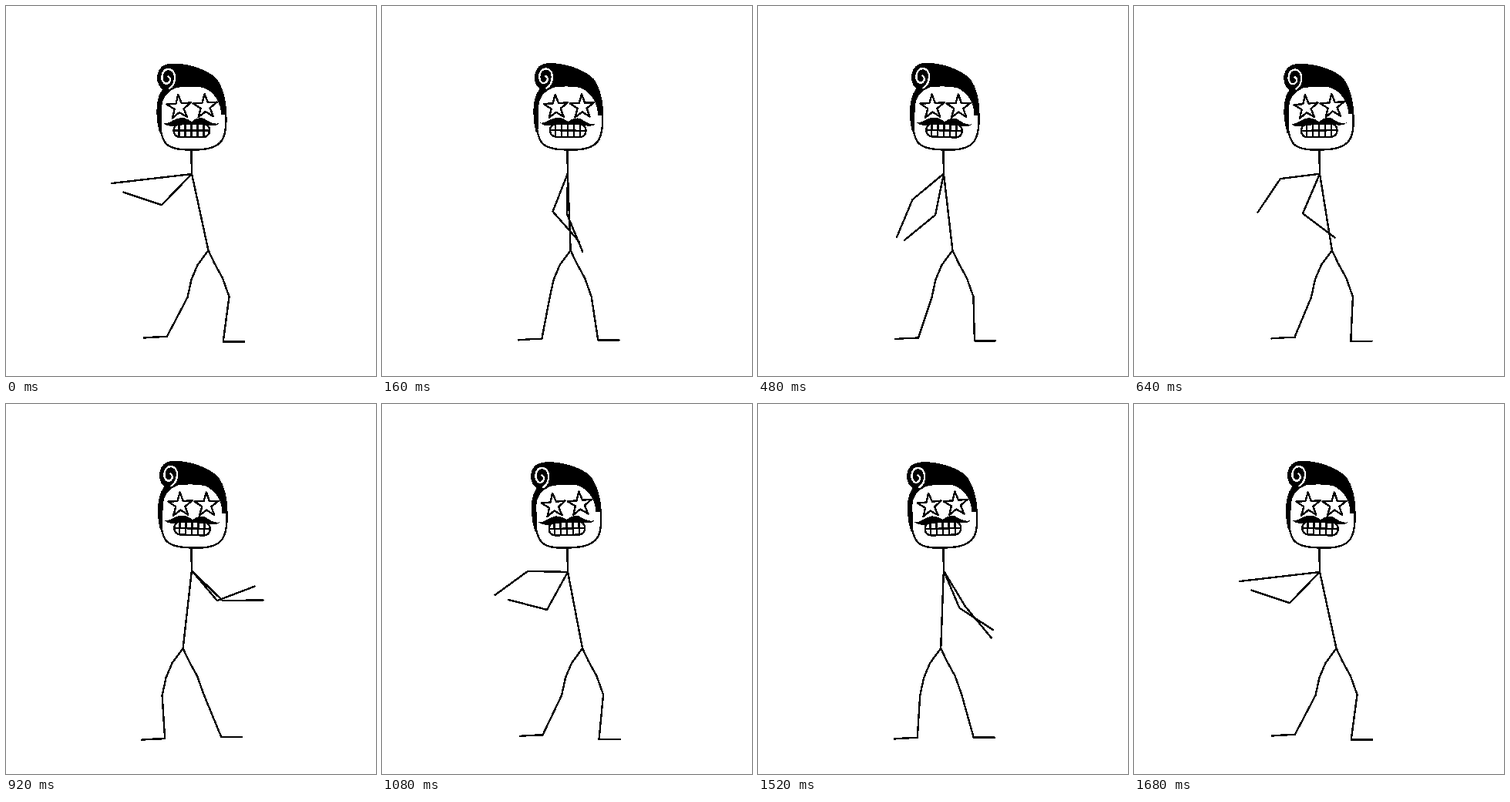
An HTML page without scripts for the animation above (1.72 s loop, 480 by 480 pixels).

```html
<!DOCTYPE html>
<html lang="en">
<head>
<meta charset="utf-8">
<title>Dancing stick figure</title>
<style>
  @property --tick { syntax: "<number>"; inherits: true; initial-value: 0; }
  @property --hip { syntax: "<number>"; inherits: true; initial-value: 1; }
  @property --upper { syntax: "<angle>"; inherits: true; initial-value: 0deg; }
  @property --fore { syntax: "<angle>"; inherits: true; initial-value: 0deg; }
  @property --len { syntax: "<number>"; inherits: true; initial-value: 52; }

  html, body { margin: 0; width: 100%; height: 100%; overflow: hidden; background: #fff; }
  svg {
    display: block; width: 100vw; height: 100vh;
    fill: none; stroke: #000; stroke-width: 2.4;
    stroke-linecap: round; stroke-linejoin: round; shape-rendering: crispEdges;
    animation: tick 1720ms steps(43) -2ms infinite, sway 1720ms -2ms infinite;
  }
  path { vector-effect: non-scaling-stroke; }
  .ink { fill: #000; stroke: none; }

  /* 43 ticks of 40ms per loop; one hip swing takes 14 ticks */
  @keyframes tick { from { --tick: 0; } to { --tick: 43; } }
  @keyframes sway {
    0%, 32.558%, 65.116%, 97.674%, 100% { --hip: 1; animation-timing-function: steps(2); }
    4.651%, 37.209%, 69.767% { --hip: .84; animation-timing-function: steps(4); }
    13.953%, 46.512%, 79.07% { --hip: .14; animation-timing-function: steps(2); }
    18.605%, 51.163%, 83.721% { --hip: 0; animation-timing-function: steps(1); }
    20.93%, 53.488%, 86.047% { --hip: .06; animation-timing-function: steps(4); }
    30.233%, 62.791%, 95.349% { --hip: .93; animation-timing-function: steps(1); }
  }
  @keyframes reach {
    0%, 32.558%, 65.116%, 97.674%, 100% { --upper: 83.4deg; --fore: 83.4deg; --len: 52; animation-timing-function: steps(2); }
    4.651%, 37.209%, 69.767% { --upper: 82.8deg; --fore: 34deg; --len: 51.5; animation-timing-function: steps(4); }
    13.953%, 79.07% { --upper: -81deg; --fore: -79deg; --len: 55; animation-timing-function: steps(3); }
    46.512% { --upper: -80deg; --fore: -80deg; --len: 55; animation-timing-function: steps(2); }
    51.163% { --upper: -76deg; --fore: -78deg; --len: 55; animation-timing-function: steps(1); }
    20.93%, 86.047% { --upper: -72deg; --fore: -71deg; --len: 55; animation-timing-function: steps(4); }
    53.488% { --upper: -45.7deg; --fore: -91deg; --len: 56; animation-timing-function: steps(4); }
    30.233%, 62.791%, 95.349% { --upper: 91deg; --fore: 54deg; --len: 52; animation-timing-function: steps(1); }
  }
  @keyframes tuck {
    0%, 32.558%, 65.116%, 97.674%, 100% { --upper: 44.3deg; --fore: 108.4deg; --len: 56; animation-timing-function: steps(2); }
    4.651%, 37.209%, 69.767% { --upper: 23.2deg; --fore: -53deg; --len: 56; animation-timing-function: steps(4); }
    13.953%, 46.512%, 79.07% { --upper: 19.6deg; --fore: -29.5deg; --len: 50.6; animation-timing-function: steps(3); }
    20.93%, 53.488%, 86.047% { --upper: -40.2deg; --fore: -110.8deg; --len: 51; animation-timing-function: steps(4); }
    30.233%, 62.791%, 95.349% { --upper: 28.8deg; --fore: 104.6deg; --len: 56; animation-timing-function: steps(1); }
  }

  .head { transform-origin: 241px 187px; transform: rotate(calc(sin(var(--tick) * 36deg) * 1.9deg)); }

  .shoulder { transform: translate(241px, calc(216px + var(--hip) * 2px)); }
  .arm { transform: rotate(var(--upper)); }
  .arm.reach { animation: reach 1720ms -2ms infinite; }
  .arm.tuck { animation: tuck 1720ms -2ms infinite; }
  .upper { transform: scaleY(var(--len)); }
  .fore { transform: translateY(calc(var(--len) * 1px)) rotate(calc(var(--fore) - var(--upper))); }

  .torso { transform-origin: 241px 217px; transform: matrix(1, 0, calc(var(--hip) * .35), 1, 0, 0); }
  .thighs { transform: translateX(calc(var(--hip) * 35px)); }
  .left.foot { transform: translate(calc(var(--hip) * 3px), calc(var(--hip) * -5.5px)); }
  .left.shin { transform-origin: 206px 434px; transform: matrix(1, 0, calc(var(--hip) * -.571), calc(1 - var(--hip) * .098), 0, 0); }
  .right.foot { transform: translate(calc(var(--hip) * 3px), calc(var(--hip) * 4px)); }
  .right.shin { transform-origin: 279px 431px; transform: matrix(1, 0, calc(var(--hip) * -.593), calc(1 + var(--hip) * .074), 0, 0); }
</style>
</head>
<body>
<svg viewBox="0 0 480 480">
  <defs>
    <path id="star" d="M0-16.500 3.700-5 15.600-5 6 2 9.600 13.200 0 6.500-9.600 13.200-6 2-15.600-5-3.700-5Z"/>
  </defs>

  <path d="M240.300 187 241 217"/>
  <path class="torso" d="M241 216 227.500 317"/>

  <path class="thighs" d="M200.500 378 205.500 355 213.500 336 227.500 317 235 333 246 353 254.500 377"/>
  <g class="left foot">
    <path d="M206 434.500 190 435 176 436"/>
    <path class="left shin" d="M200.500 378 206 434.500"/>
  </g>
  <g class="right foot">
    <path d="M279 431.500H306"/>
    <path class="right shin" d="M254.500 377 279 431.500"/>
  </g>

  <g class="shoulder">
    <g class="arm tuck"><path class="upper" d="M0 0V1"/><path class="fore" d="M0 0V52"/></g>
    <g class="arm reach"><path class="upper" d="M0 0V1"/><path class="fore" d="M0 0V52.500"/></g>
  </g>

  <g class="head">
    <path d="M199.500 140C199 158 202 172 208 179C217 187 232 186.500 245 186.500C260 186.500 273 184 279.500 175C286 166 286 152 285 138"/>
    <path class="ink" d="M202 166 199 164 196.500 152C193.500 132 196 117 203 108C196 104 194 92 198 84C202 75.500 210 74.500 218 74.500C238 74.500 262 83 273 94C281 104 286.500 124 286 141H279C279 126 270 111 256 106C248 104 232 104 221 106C208 111 203 120 202 130Z"/>
    <path stroke="#fff" d="M212 107C221 101 222 83 211 82C202 82 200 95 205.500 100C211 103 216 95 210.500 91.500"/>
    <use href="#star" transform="translate(224.500 131.500) rotate(-4)"/>
    <use href="#star" transform="translate(258.500 130.500) rotate(-3)"/>
    <rect x="217.500" y="153" width="46.500" height="17" rx="8"/>
    <path d="M218 161.500H263M224.500 154V169M232.500 154V170M240.500 154V170M248.500 154V170M256.500 154V169"/>
    <path class="ink" d="M204 152C212 154 217 145.500 227 145C234 145 237 148 241 150C245 146 252 144 257 146C265 151 270 154 277 152C272 157 264 155 258 154C250 153 245 154 241 152C235 155 229 154 222 155C215 157 208 156 204 152Z"/>
  </g>
</svg>
</body>
</html>
```
